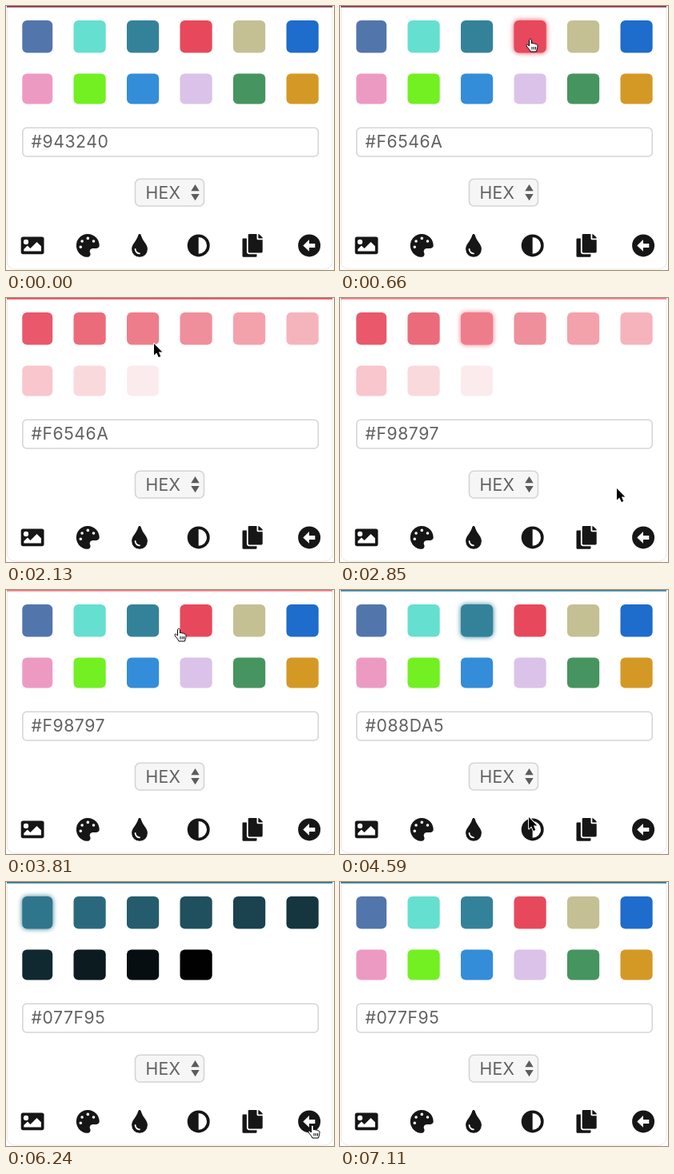
Animation, 410 px wide and 330 px high, one loop 7.14 s. Source, as an HTML page:

```html
<!DOCTYPE html>
<html lang="en">
<head>
<meta charset="utf-8">
<style>
  html, body { margin: 0; width: 100%; height: 100%; overflow: hidden; background: #fff; }
  svg { display: block; }
  text { font: 21.2px Inter, sans-serif; letter-spacing: .3px; fill: #626262; }
  #hex { letter-spacing: .55px; }
  .field { stroke: #d5d5d5; stroke-width: 1.6; }
  #icons { fill: #161616; }
  #icons .w { fill: #fff; }
</style>
</head>
<body>
<svg width="410" height="330" viewBox="0 0 410 330">
  <path d="M1.500 0V320a9 9 0 0 0 9 9H399a9 9 0 0 0 9-9V0" fill="#fff" stroke="#e8e8e8"/>
  <rect id="bar" x="1" width="407" height="1.700"/>
  <g id="swatches"></g>

  <rect class="field" x="20.800" y="152.300" width="369.500" height="35.700" rx="5" fill="#fff"/>
  <text id="hex" x="31.500" y="177"></text>
  <rect class="field" x="161.500" y="216.300" width="86" height="33.700" rx="6" fill="#f6f6f6"/>
  <text x="174.500" y="241">HEX</text>
  <path d="M231.300 231.300l5.200-8.300 5.200 8.300zM231.300 235l5.200 8.300 5.200-8.300z" fill="#5c5c5c"/>

  <g id="icons">
    <g>
      <rect y="64" width="512" height="384" rx="48"/>
      <circle class="w" cx="112" cy="176" r="56"/>
      <path class="w" d="M64 384v-48l80-80 64 64 144-144 96 96v112z"/>
    </g>
    <g>
      <path d="M204 5C105 24 25 104 5 203c-37 187 132 327 259 307 41-6 61-55 42-92-23-45 10-98 61-98h80c36 0 65-30 65-65C511 97 368-27 204 5z"/>
      <path d="M96 288h0M128 160h0M256 96h0M384 160h0" stroke="#fff" stroke-width="64" stroke-linecap="round"/>
    </g>
    <g>
      <path d="M205 22c-8-29-49-30-58 0C100 180 0 223 0 334a176 178 0 0 0 352 0c0-112-100-153-147-312z"/>
      <path d="M80 336a96 96 0 0 0 96 96" fill="none" stroke="#fff" stroke-width="32" stroke-linecap="round"/>
    </g>
    <g>
      <circle cx="256" cy="256" r="248"/>
      <path class="w" d="M256 72a184 184 0 0 1 0 368z"/>
    </g>
    <g>
      <path d="M96 96H24a24 24 0 0 0-24 24v368a24 24 0 0 0 24 24h272a24 24 0 0 0 24-24v-40H152a56 56 0 0 1-56-56z"/>
      <path d="M320 0H152a24 24 0 0 0-24 24v368a24 24 0 0 0 24 24h272a24 24 0 0 0 24-24V128H344a24 24 0 0 1-24-24zM352 0v96h96q0-14-7-23L375 7q-8-7-23-7z"/>
    </g>
    <g>
      <circle cx="256" cy="256" r="248"/>
      <path class="w" d="M118 256L254 124v88h130v88H254v88z"/>
    </g>
  </g>

  <g id="cursor" stroke-linejoin="round">
    <path id="arrow" d="M0 0V14.500L3.300 11.500 5.800 17 8.300 16 5.900 10.500H10.300Z" stroke="#fff" stroke-width="1.800" paint-order="stroke"/>
    <path id="hand" d="M-1.500 1c0-2.300 3-2.300 3 0v4c.5-1 2.300-1 2.700.3.700-.8 2.300-.6 2.600.8 1-.6 2.200 0 2.200 1.400 0 3-.6 4-1.500 7.500H0C-1 12-4 10-5 7.500c-.5-1.800 1.500-2.200 3.500.5zM2 9v3.500M4.300 9v3.500M6.500 9v3.500" fill="#fff" stroke="#000"/>
  </g>
</svg>

<script>
const LOOP = 7140;
const $ = id => document.getElementById(id);
const rgb = hex => [1, 3, 5].map(i => parseInt(hex.slice(i, i + 2), 16));
const mix = (a, b, k) => {
  const to = rgb(b);
  return "#" + rgb(a).map((v, i) => Math.round(v + (to[i] - v) * k).toString(16).padStart(2, "0")).join("");
};
const ramp = (from, to, n) => Array.from({length: n}, (_, i) => mix(from, to, (i + .9) / 10));

const RED = "#e7485c", TEAL = "#34829a";
const main = ["#5275ab", "#65dfcf", TEAL, RED, "#c4c094", "#1e6ccb",
              "#ed9ac3", "#72f022", "#348dd9", "#dbc2e9", "#46945f", "#d49925"];
const tints = ramp(RED, "#ffffff", 9), shades = ramp(TEAL, "#000000", 10);

// Each stop of the pointer: bow bends the way there, a click opens a palette or picks a swatch
const stops = [
  {x: 414, y: 288, leave: 30},
  {x: 238, y: 42, arrive: 520, click: 650, leave: 860, pick: 3, code: "#F6546A"},
  {x: 168, y: 297, arrive: 1700, click: 1740, leave: 1780, bow: 200, open: tints},
  {x: 171, y: 39, arrive: 2230, click: 2260, leave: 2275, bow: -114, pick: 2, code: "#F98797"},
  {x: 377, y: 299, arrive: 3210, click: 3390, leave: 3390, bow: 43, open: main},
  {x: 171, y: 43, arrive: 3964, click: 4050, leave: 4130, bow: -174, pick: 2, code: "#088DA5"},
  {x: 240, y: 297, arrive: 4700, click: 4860, leave: 4890, open: shades},
  {x: 19, y: 30, arrive: 5380, click: 5610, leave: 5620, pick: 0, code: "#077F95"},
  {x: 383, y: 305, arrive: 6220, click: 6390, leave: 6390, open: main},
  {x: 424, y: 300, arrive: 7020}
];

const smooth = u => u * u * (3 - 2 * u);

function pointer(t) {
  const i = Math.max(1, stops.findIndex(s => s.arrive > t));
  const a = stops[i - 1], b = stops[i];
  const u = Math.max(0, Math.min(1, (t - a.leave) / (b.arrive - a.leave)));
  const e = smooth(u ** .7), dx = b.x - a.x, dy = b.y - a.y;
  const side = 2 * e * (1 - e) * (b.bow || 0) / Math.hypot(dx, dy);
  return [a.x + dx * e + dy * side, a.y + dy * e - dx * side];
}

function stateAt(t) {
  const s = {colors: main, glow: -1, code: "#943240", bar: "#84304a", old: "#84304a", since: 0};
  for (const {click, open, pick, code} of stops) {
    if (!(click <= t)) continue;
    if (open) Object.assign(s, {colors: open, glow: -1});
    else Object.assign(s, {glow: pick, code, old: s.bar, bar: s.colors[pick], since: click});
  }
  return s;
}

const boxes = main.map((_, i) => {
  const left = 18 + 66.5 * (i % 6), x = Math.max(20.3, left), low = i > 5;
  return {x, y: low ? 84.6 : 18, width: left + 40.2 - x, height: low ? 38 : 40.4, rx: 6};
});
const swatches = boxes.map(box => {
  const el = document.createElementNS("http://www.w3.org/2000/svg", "rect");
  for (const key in box) el.setAttribute(key, box[key]);
  return $("swatches").appendChild(el);
});
const iconX = i => 18.7 + 69.2 * i;
[...$("icons").children].forEach((el, i) => el.setAttribute("transform", `translate(${iconX(i)} 285) scale(.0563)`));

function draw(t) {
  const {colors, glow, code, bar, old, since} = stateAt(t);
  swatches.forEach((el, i) => {
    el.style.fill = colors[i] || "none";
    el.style.filter = i === glow ? `drop-shadow(0 0 3px ${colors[i]})` : "none";
  });
  $("hex").textContent = code;
  $("bar").style.fill = mix(old, bar, Math.min(1, (t - since) / 300));

  const [x, y] = pointer(t);
  const inside = (left, top, w, h) => x > left && x < left + w && y > top && y < top + h;
  const over = boxes.some((b, i) => colors[i] && inside(b.x - 2, b.y, b.width, b.height - 5)) ||
    swatches.some((_, i) => i < 6 && inside(iconX(i), 285, 29, 29));
  $("cursor").setAttribute("transform", `translate(${Math.round(x)} ${Math.round(y)})`);
  $("cursor").style.display = t < 30 || t > 7020 ? "none" : "";
  $("hand").style.display = over ? "" : "none";
  $("arrow").style.display = over ? "none" : "";
}

function frame() {
  draw(performance.now() % LOOP);
  requestAnimationFrame(frame);
}
frame();
</script>
</body>
</html>
```
